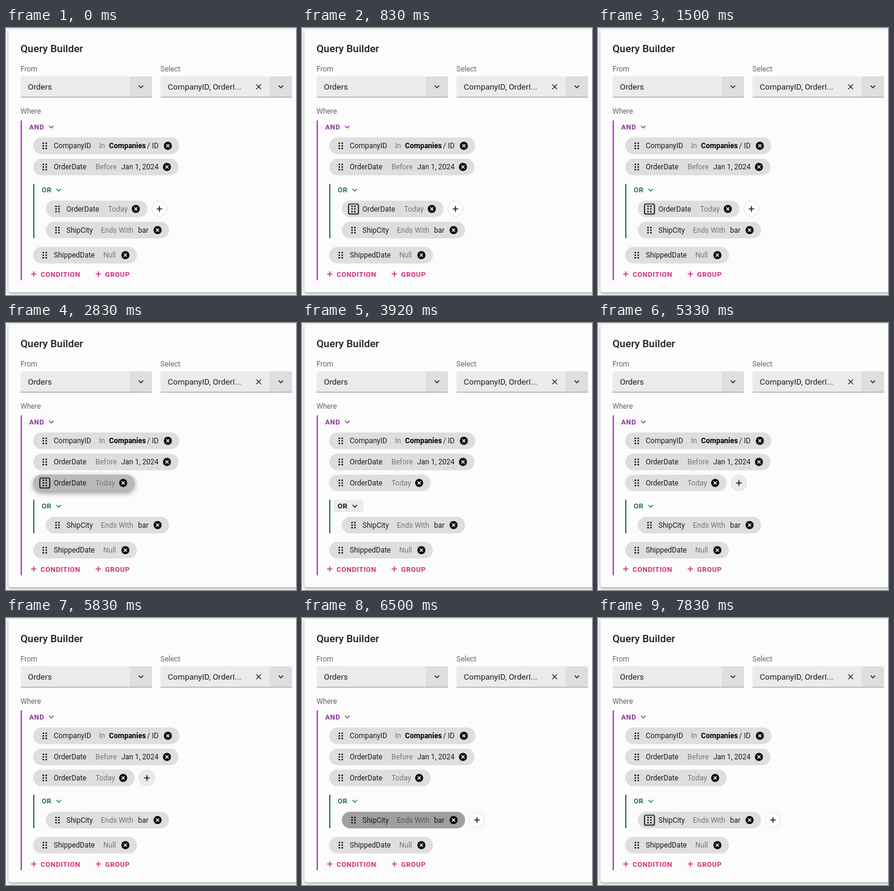
Animation of 480x442 px, one loop 8 s. Source, as an HTML page:

```html
<!DOCTYPE html>
<html lang="en">
<head>
<meta charset="utf-8">
<title>Query Builder</title>
<style>
  html, body { margin: 0; width: 100%; height: 100%; overflow: hidden; background: #f6f6f6; }
  svg { display: block; width: 100%; height: 100%; overflow: hidden; }
  text { font: 400 12px Roboto, sans-serif; fill: #1c1c1c; white-space: pre; }
  .card { fill: #fcfcfc; filter: drop-shadow(0 1px 2px rgba(0, 0, 0, .24)) drop-shadow(0 2px 1px rgba(0, 0, 0, .16)); }
  .title { font-size: 17.2px; font-weight: 500; }
  .field { font-size: 13.4px; }
  .label { fill: #666; }
  .op { fill: #777; }
  .bold { font-weight: 700; fill: #000; }
  .caps { font-size: 11.6px; font-weight: 600; letter-spacing: .5px; }
  .stroke { fill: none; stroke-width: 1.5; }
</style>
</head>
<body>
<svg id="stage" viewBox="0 0 480 442" preserveAspectRatio="xMinYMin"></svg>
<script>
const LOOP = 8000;
const AT = { grab: 600, move: 2100, drop: 3350, add: 4640, chip: 5920, handle: 7150 };
const INK = '#161616', PINK = '#d12f7c', PURPLE = '#873a96', GREEN = '#17705f';
const stage = document.getElementById('stage');

function add(parent, tag, attrs = {}, content = '') {
  const el = document.createElementNS('http://www.w3.org/2000/svg', tag);
  for (const key in attrs) el.setAttribute(key, attrs[key]);
  el.textContent = content;
  return parent.appendChild(el);
}
const group = (parent, x = 0, y = 0) => add(parent, 'g', { transform: `translate(${x} ${y})` });
const text = (parent, x, y, content, cls = '', fill = '') =>
  add(parent, 'text', { x, y, class: cls, style: fill && `fill:${fill}` }, content);
const line = (parent, d, color, width = 1.5) =>
  add(parent, 'path', { d, class: 'stroke', stroke: color, style: `stroke-width:${width}` });
const rect = (parent, x, y, width, height, rx, fill) =>
  add(parent, 'rect', { x, y, width, height, rx, fill });

const chevron = (parent, x, y, color) => line(parent, `M${x - 3.7} ${y - 1.9}l3.7 3.8 3.7 -3.8`, color, 1.4);
const plus = (parent, x, y, color, r = 4.7) =>
  line(parent, `M${x - r} ${y}h${2 * r}M${x} ${y - r}v${2 * r}`, color, 1.6);
const cross = (parent, x, y, r, color, width) =>
  line(parent, `M${x - r} ${y - r}l${2 * r} ${2 * r}m0 ${-2 * r}l${-2 * r} ${2 * r}`, color, width);

// Plays [time, value] steps as hard changes.
function play(el, prop, steps) {
  const frames = steps.map(([t, value]) => ({ offset: t / LOOP, [prop]: value, easing: 'steps(1, end)' }));
  frames.push({ offset: 1, [prop]: steps.at(-1)[1] });
  el.animate(frames, { duration: LOOP, iterations: Infinity });
}
function show(el, from, to = LOOP) {
  const steps = [[from, 1]];
  if (from > 0) steps.unshift([0, 0]);
  if (to < LOOP) steps.push([to, 0]);
  play(el, 'opacity', steps);
}

function field(x, value) {
  rect(stage, x, 80, 217.5, 34, 3, '#ecebeb');
  rect(stage, x + 180.5, 80, 37, 34, 2, '#dedede');
  line(stage, `M${x} 114.5h217.5`, '#929292', 1);
  text(stage, x + 12, 101.8, value, 'field');
  chevron(stage, x + 199.2, 97.2, INK);
}

// Chip origin is its left end at mid height; parts are [x, text, class].
function chip(x, y, width, parts) {
  const g = group(stage, x, y);
  const body = rect(g, 0, -13.7, width, 27.4, 13.7, '#dedede');
  const ring = rect(g, 11, -8, 16.4, 16.4, 2.5, 'none');
  ring.setAttribute('stroke', '#111');
  ring.setAttribute('stroke-width', 1.7);
  ring.setAttribute('opacity', 0);
  for (const dx of [16.8, 21.6])
    for (const dy of [-4.2, .1, 4.4]) add(g, 'circle', { cx: dx, cy: dy, r: 1.4, fill: INK });
  for (const [dx, content, cls] of parts) text(g, dx, 4.3, content, cls);
  const end = width - 19.1;
  add(g, 'circle', { cx: end, cy: 0, r: 6.7, fill: '#080808' });
  cross(g, end, 0, 2.5, '#fff', 1.4);
  return { g, body, ring };
}

function addButton(x, y, fill, edge) {
  const g = group(stage, x, y);
  add(g, 'circle', { r: 12.8, fill, stroke: edge });
  plus(g, 0, 0, INK);
  return g;
}

function combinator(x, y, name, width, color) {
  const g = group(stage, x, y);
  text(g, 0, 4.3, name, 'caps', color);
  chevron(g, width, .2, color);
  return g;
}

rect(stage, 4, 2, 490, 435.5, 4).setAttribute('class', 'card');
text(stage, 24, 40.2, 'Query Builder', 'title');
text(stage, 24, 72.3, 'From', 'label');
text(stage, 255.5, 72.3, 'Select', 'label');
text(stage, 24, 142.2, 'Where', 'label');
field(24.2, 'Orders');
field(255.8, 'CompanyID, OrderI...');
cross(stage, 418.2, 97.4, 4, INK, 1.3);

line(stage, 'M25.3 153V417.5', '#a42dba', 2);
combinator(38.3, 163.5, 'AND', 36.7, PURPLE);

chip(45, 195, 242, [[34, 'CompanyID'], [109, 'In', 'op'], [125.6, 'Companies', 'bold'], [188.5, '/ ID']]);
chip(45, 230, 240.5, [[34, 'OrderDate'], [103, 'Before', 'op'], [145.7, 'Jan 1, 2024']]);
chip(45, 376, 171.7, [[34, 'ShippedDate'], [116, 'Null', 'op']]);
const city = chip(66, 334.5, 204, [[34, 'ShipCity'], [91, 'Ends With', 'op'], [152.4, 'bar']]);
const date = chip(66, 299.5, 168, [[34, 'OrderDate'], [103, 'Today', 'op']]);

// The nested group gives one row to its parent.
const longBar = line(stage, 'M46 258V348', '#276f60', 2);
const shortBar = line(stage, 'M46 292.5V348', '#276f60', 2);
show(longBar, 0, AT.move);
show(shortBar, AT.move);
play(date.g, 'transform', [[0, 'translate(66px, 299.5px)'], [AT.move, 'translate(45px, 264.7px)']]);
play(date.body, 'fill', [[0, '#dedede'], [AT.move, '#b9b9b9'], [AT.drop, '#dedede']]);
play(date.body, 'filter', [[0, 'none'], [AT.move, 'drop-shadow(0 3px 4px rgba(0,0,0,.42))'], [AT.drop, 'none']]);
show(date.ring, AT.grab, AT.drop);

show(combinator(59, 268, 'OR', 28.3, GREEN), 0, AT.move);
const lowerOr = combinator(59, 303, 'OR', 28.3, GREEN);
play(lowerOr, 'opacity', [[0, 0], [AT.move, 1], [AT.drop, 0], [AT.add, 1]]);
const focusedOr = group(stage);
rect(focusedOr, 52, 292.5, 49.3, 20.6, 3, '#ebebeb');
focusedOr.append(combinator(59, 303, 'OR', 28.3, '#111'));
show(focusedOr, AT.drop, AT.add);

show(addButton(254, 299.5, '#fdfdfd', '#dedede'), 0, AT.move);
show(addButton(233.2, 264.7, '#ececec', '#d6d6d6'), AT.add, AT.chip);
show(addButton(289.6, 334.5, '#fdfdfd', '#dedede'), AT.chip);
play(city.body, 'fill', [[0, '#dedede'], [AT.chip, '#9f9f9f'], [AT.handle, '#dedede']]);
play(city.g.querySelector('.op'), 'fill', [[0, '#777'], [AT.chip, '#555'], [AT.handle, '#777']]);
show(city.ring, AT.handle);

for (const [x, name] of [[46, 'CONDITION'], [152.8, 'GROUP']]) {
  plus(stage, x, 407.3, PINK, 4.4);
  text(stage, x + 11.2, 411.6, name, 'caps', PINK);
}
</script>
</body>
</html>
```
